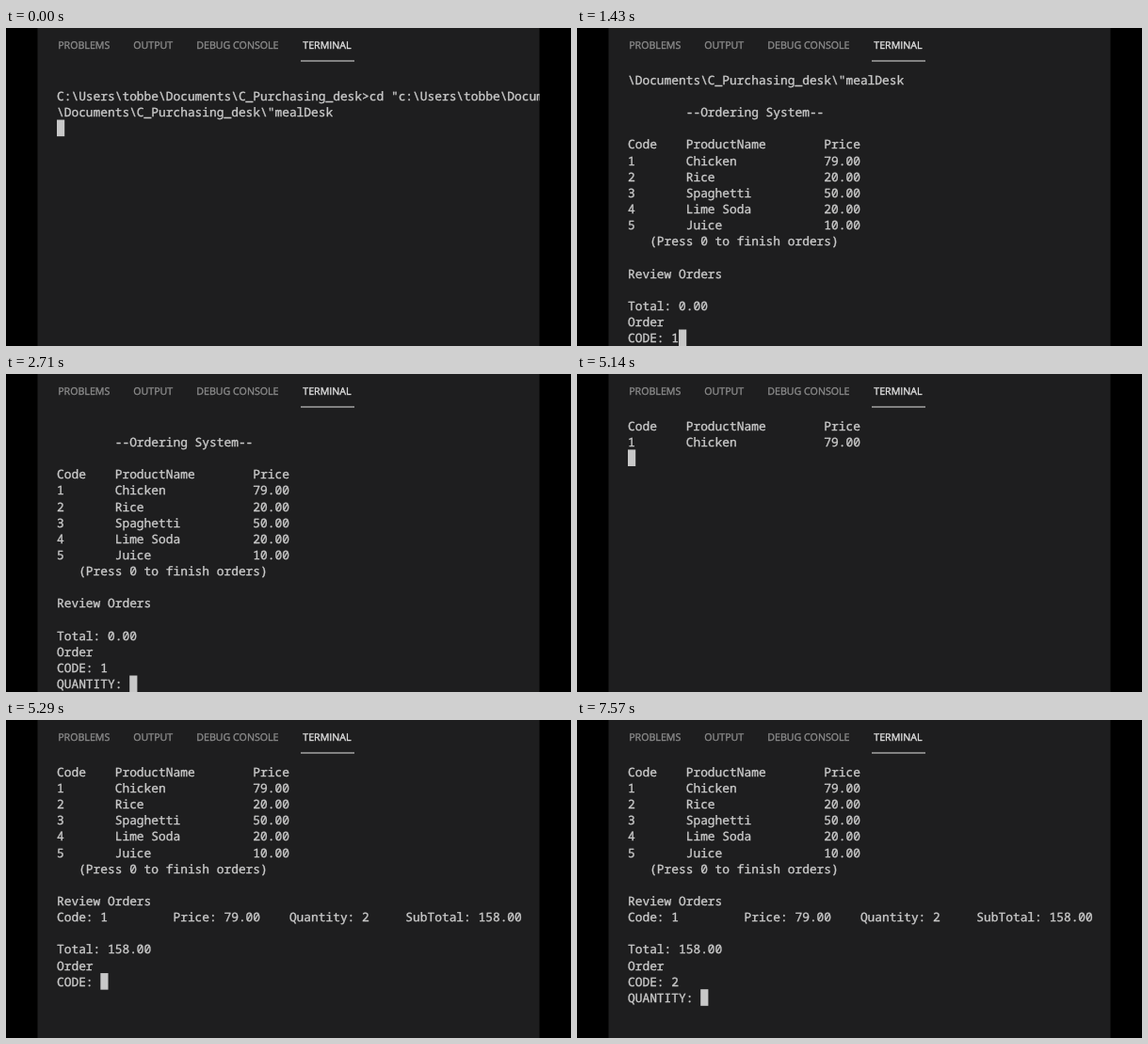
These frames come from a looping animation (600 px wide and 338 px high, 8000 ms). An HTML page:

```html
<!DOCTYPE html>
<html lang="en">
<head>
<meta charset="utf-8">
<title>Terminal</title>
<style>
  html, body { margin: 0; width: 100%; height: 100%; overflow: hidden; background: #000; }
  svg { display: block; width: 100vw; height: 100vh; }
  text { white-space: pre; text-rendering: geometricPrecision; stroke-width: .35px; }
  .tabs { font: 10.65px "Open Sans", sans-serif; fill: #8c8c8c; stroke: #8c8c8c; }
  .tabs .active { fill: #e6e6e6; stroke: #e6e6e6; }
  #screen { font: 12.87px "Noto Sans Mono", monospace; fill: #cacaca; stroke: #cacaca; }
</style>
</head>
<body>
<svg viewBox="0 0 600 338">
  <clipPath id="panel"><rect x="33.5" width="533" height="338"/></clipPath>
  <rect width="600" height="338" fill="#000"/>
  <g clip-path="url(#panel)">
    <rect x="33" width="534" height="338" fill="#1e1e1f"/>
    <g class="tabs">
      <text x="55.2" y="22.3">PROBLEMS</text>
      <text x="135.3" y="22.3">OUTPUT</text>
      <text x="202.3" y="22.3">DEBUG CONSOLE</text>
      <text x="315.3" y="22.3" class="active">TERMINAL</text>
    </g>
    <rect x="313" y="34.5" width="57" height="1" fill="#e6e6e6"/>
    <g id="screen"></g>
    <rect id="cursor" width="8.2" height="17.6" fill="#c8c8c8"/>
  </g>
</svg>
<script>
const LOOP = 8000, LEFT = 54, CHAR = 7.72, LINE = 17.15, BASELINE = 59.8, CURSOR_TOP = 46.1;
const screenGroup = document.getElementById('screen');
const cursor = document.getElementById('cursor');

const folder = '\\Documents\\C_Purchasing_desk';
const home = ':\\Users\\tobbe';
const path = folder + '\\"mealDesk';
const command = `C${home}${folder}>cd "c${home}\\Documents`;

const row = (code, name, price) => code.padEnd(8) + name.padEnd(19) + price;
const table = [
  row('Code', 'ProductName', 'Price'),
  row('1', 'Chicken', '79.00'),
  row('2', 'Rice', '20.00'),
  row('3', 'Spaghetti', '50.00'),
  row('4', 'Lime Soda', '20.00'),
  row('5', 'Juice', '10.00'),
  '   (Press 0 to finish orders)', '',
  'Review Orders'
];
const title = ['', '        --Ordering System--', ''];
const empty = [...title, ...table, '', 'Total: 0.00', 'Order'];
const reviewed = [
  ...table,
  ['Code: 1', 'Price: 79.00', 'Quantity: 2', 'SubTotal: 158.00'].map(s => s.padEnd(16)).join(''),
  '', 'Total: 158.00', 'Order'
];

// Each state is [start time, visible lines]; the cursor ends the last line.
const states = [
  [0, ['', command, path, '']],
  [430, [path, ...empty, 'CODE: ']],
  [1430, [path, ...empty, 'CODE: 1']],
  [2710, [...empty, 'CODE: 1', 'QUANTITY: ']],
  [4570, [...empty, 'CODE: 1', 'QUANTITY: 2']],
  [5140, [...table.slice(0, 2), '']],
  [5290, [...reviewed, 'CODE: ']],
  [7140, [...reviewed, 'CODE: 2']],
  [7570, [...reviewed, 'CODE: 2', 'QUANTITY: ']]
];

function show(lines) {
  screenGroup.replaceChildren(...lines.map((line, i) => {
    const text = document.createElementNS('http://www.w3.org/2000/svg', 'text');
    text.setAttribute('x', LEFT);
    text.setAttribute('y', BASELINE + i * LINE);
    text.textContent = line;
    return text;
  }));
  cursor.setAttribute('x', LEFT + lines.at(-1).length * CHAR);
  cursor.setAttribute('y', CURSOR_TOP + (lines.length - 1) * LINE);
}

let current;
function frame() {
  const time = performance.now() % LOOP;
  const state = states.findLast(([start]) => start <= time);
  if (state !== current) show((current = state)[1]);
  requestAnimationFrame(frame);
}
frame();
</script>
</body>
</html>
```
